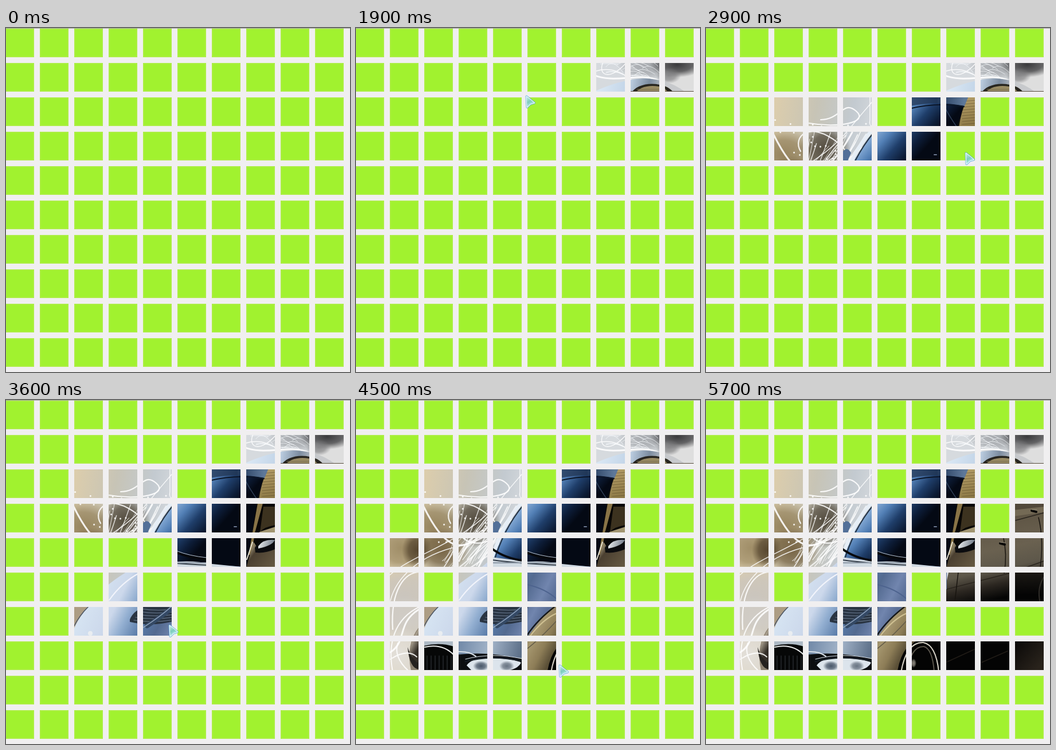
An HTML page with a canvas for the animation above (5800 ms loop, 600 by 600 pixels).

```html
<!DOCTYPE html>
<html lang="en">
<head>
<meta charset="utf-8">
<title>Tile reveal</title>
<style>
html, body { margin: 0; width: 100%; height: 100%; overflow: hidden; background: #f0eff0; }
canvas { display: block; width: 600px; height: 600px; }
</style>
</head>
<body>
<canvas id="stage" width="600" height="600"></canvas>
<script>
const LOOP = 5800, STEP = 100, PITCH = 60, TILE = 50;
const ctx = document.getElementById('stage').getContext('2d');

// Each step: pointer x, y, then the cells it uncovers (row * 10 + column).
const sweeps = [
  { start: 1, steps: [[588, 55]] },
  { start: 11, steps: [[578, 55], [561, 72, 19], [540, 88], [516, 97, 18], [490, 101], [461, 101]] },
  { start: 17, steps: [[410, 107, 17], [354, 114], [296, 118], [245, 128, 24], [185, 148, 23], [136, 175, 22]] },
  { start: 23, steps: [[141, 200, 32], [196, 216, 33], [265, 212, 34], [340, 196, 35], [412, 170, 36, 26], [469, 173, 27]] },
  { start: 29, steps: [[452, 217], [432, 255, 37, 47], [370, 272, 46], [302, 286, 45], [223, 315, 53], [152, 375, 62]] },
  { start: 35, steps: [[206, 402, 63], [284, 392, 64], [325, 348, 65, 55], [272, 278, 44], [186, 262, 43], [95, 300, 42, 41]] },
  { start: 41, steps: [[78, 345, 51], [80, 410, 61], [112, 455, 71], [232, 467, 72, 73], [354, 462, 74, 75], [393, 465, 76]] },
  { start: 47, steps: [[450, 460, 77], [530, 450, 78], [592, 321, 79], null] },
  { start: 52, steps: [[575, 341, 59], [500, 338, 58], [416, 312, 57], [478, 282, 48], [560, 245, 49], [null, null, 39]] }
];

const pointerAt = [], openAt = new Map();
for (const { start, steps } of sweeps) {
  steps.forEach((step, i) => {
    const [x, y, ...cells] = step || [null];
    pointerAt[start + i] = x === null ? null : { x, y };
    cells.forEach(cell => openAt.set(cell, start + i));
  });
}

const photo = document.createElement('canvas');
photo.width = photo.height = 600;
const pc = photo.getContext('2d');

// Stops are [offset, colour] pairs.
function grad(x0, y0, x1, y1, ...stops) {
  const g = pc.createLinearGradient(x0, y0, x1, y1);
  stops.forEach(([at, colour]) => g.addColorStop(at, colour));
  return g;
}

function fill(path, style) {
  pc.fillStyle = style;
  pc.fill(new Path2D(path));
}

function line(path, colour, width) {
  pc.strokeStyle = colour;
  pc.lineWidth = width;
  pc.stroke(new Path2D(path));
}

function blob(x, y, rx, ry, rgb, alpha = 1) {
  pc.save();
  pc.translate(x, y);
  pc.scale(rx, ry);
  const g = pc.createRadialGradient(0, 0, 0, 0, 0, 1);
  g.addColorStop(0, `rgba(${rgb},${alpha})`);
  g.addColorStop(0.55, `rgba(${rgb},${alpha * 0.75})`);
  g.addColorStop(1, `rgba(${rgb},0)`);
  pc.fillStyle = g;
  pc.fillRect(-1, -1, 2, 2);
  pc.restore();
}

function backdrop() {
  fill('M0 0H600V600H0Z', grad(120, 130, 300, 160,
    [0, '#dccdac'], [0.4, '#c7c4b6'], [0.75, '#c3cad0'], [1, '#d6dade']));
  blob(135, 222, 62, 48, '150,132,94');
  blob(208, 212, 44, 46, '82,74,60');
  blob(150, 262, 48, 40, '120,102,70');
  blob(78, 258, 50, 46, '160,142,104');
  blob(106, 262, 26, 32, '88,72,48');
  blob(84, 345, 70, 62, '202,197,190');
  blob(84, 385, 60, 44, '208,204,198');
  blob(75, 445, 55, 50, '226,223,218');
  blob(505, 66, 50, 26, '155,158,162', 0.8);
  fill('M535 55H600V115H535Z', '#dedede');
  blob(560, 64, 48, 22, '58,58,60');
  blob(545, 83, 22, 14, '120,120,122', 0.8);
}

function scribbles() {
  pc.lineCap = 'round';
  [
    'M58 306C110 262 190 250 250 176S300 128 287 100',
    'M180 166C230 175 285 165 262 145S235 160 200 160',
    'M118 186C150 250 190 300 255 182',
    'M60 350C70 310 110 270 180 255S260 200 270 180',
    'M64 400C60 330 85 300 112 300',
    'M60 440C90 420 70 390 110 365',
    'M286 120V160Q284 170 290 172',
    'M165 215C150 190 180 160 230 200S200 270 180 232',
    'M415 82C450 98 500 76 528 92',
    'M432 58C420 80 440 95 470 62M419 75Q450 66 480 90'
  ].forEach((path, i) => line(path, 'rgba(255,255,255,.88)', 1.4 + i % 3 * 0.8));
  let seed = 7;
  const rnd = () => (seed = seed * 16807 % 2147483647) / 2147483647;
  for (let i = 0; i < 26; i++) {
    const x = 150 + rnd() * 70, y = 275 + rnd() * 22;
    line(`M${x} ${y}Q${x + 20} ${y - 10 - rnd() * 40} ${x + 30 + rnd() * 60} ${y - 50 - rnd() * 60}`,
      'rgba(255,255,255,.75)', 0.7 + rnd() * 1.6);
  }
  for (let i = 0; i < 18; i++) {
    const x = 420 + rnd() * 80;
    line(`M${x} ${60 + rnd() * 25}q12 ${-rnd() * 16} 30 ${rnd() * 10}`, 'rgba(250,252,255,.7)', 1);
  }
  for (let i = 0; i < 34; i++) {
    blob(120 + rnd() * 160, 160 + rnd() * 95, 2, 2, '255,255,255');
  }
}

function cabin() {
  fill('M410 114C440 98 478 88 506 88C540 90 560 101 575 112L600 125V180H400Z',
    grad(420, 90, 540, 110, [0, '#dce9f5'], [0.45, '#c3d5e8'], [0.75, '#7c8ca0'], [1, '#c7c9cc']));
  fill('M478 116C488 99 510 95 530 99C544 102 552 108 556 116Z', '#27251f');
  fill('M484 118C492 102 512 99 528 102C540 105 546 112 548 118Z', '#988a64');
  line('M490 107H540M486 111H545', '#756a4b', 1);

  fill('M425 292L440 175L470 110H600V360H410Z',
    grad(480, 180, 515, 345, [0, '#574d3d'], [0.5, '#6a6150'], [0.7, '#5d574a'], [0.85, '#2c2721'], [1, '#050505']));
  fill('M536 300H600V360H536Z', grad(0, 300, 0, 340, [0, '#1c1915'], [1, '#040404']));
  fill('M536 178H600V194L536 203Z', '#746a55');
  fill('M536 180H590V186L536 192Z', '#51483a');
  line('M540 210L592 196M420 330L530 302L592 280', '#2a251e', 1.5);
  line('M518 236Q526 270 520 302M580 205Q590 245 582 300M440 300L434 352', '#18140f', 1.5);
  line('M568 193l8 2M513 250l8 2', '#0b0a08', 4);
  line('M568 191l9 1M513 248l9 1', '#9a917e', 1);
  line('M592 305Q576 326 583 354', '#302d29', 2);

  fill('M415 118H475L469 180V240L424 294H410Z', '#080706');
  fill('M450 123L474 116V174H439Z', grad(445, 120, 468, 170, [0, '#b7a06a'], [1, '#8b7744']));
  for (let y = 128; y < 172; y += 5) line(`M447 ${y}l24 -2`, 'rgba(76,61,31,.45)', 1);
  line('M455 119Q443 144 439 174', '#15130f', 4);
  fill('M439 180H448L434 232L428 270H423Z', '#897447');
  fill('M449 186H470V218Q451 221 443 230Z', '#3c321f');
  fill('M442 230L470 221V233L438 240Z', '#a29672');

  fill('M232 291L260 228L292 182Q330 139 362 121H453L438 174L420 291Z',
    grad(270, 150, 370, 240, [0, '#b6cfea'], [0.32, '#80a6d2'], [0.45, '#527fb5'], [0.62, '#1f3e6a'], [0.78, '#0d1d38'], [0.92, '#040914']));
  fill('M350 121Q400 111 458 119L451 136Q400 126 352 137Z',
    grad(355, 125, 450, 130, [0, '#344e72'], [0.5, '#203758'], [1, '#5e7899']));
  line('M354 141Q404 129 450 137', '#0b1628', 2);
  line('M418 141Q424 153 437 172', 'rgba(94,119,156,.5)', 1.5);
  line('M234 288Q252 219 290 178', '#e6eef6', 6);
  line('M240 284Q257 225 292 183', '#243447', 2);
  fill('M239 215Q247 206 253 218L247 232H239Z', '#526f98');
  line('M398 221h4', '#6d7990', 2);

  // mirror and sill
  fill('M419 292L432 248L441 261L470 253V293Z', grad(420, 255, 469, 290, [0, '#c8bd9b'], [0.3, '#4b4031'], [1, '#665a43']));
  fill('M434 258Q444 238 470 241V260Q451 268 435 266Z', '#0b0c0f');
  fill('M440 255Q449 242 469 244Q465 254 440 259Z', grad(440, 246, 469, 254, [0, '#f0f3f5'], [1, '#68727f']));
  line('M420 278L430 248', '#e8e4d6', 2);
}

function bonnet() {
  fill('M112 414C128 374 160 330 207 302L234 279L300 284L420 291V330L350 360L290 472H112Z',
    grad(140, 350, 300, 430, [0, '#d6e4f2'], [0.28, '#ccd8eb'], [0.42, '#93afd1'], [0.6, '#587aa7'], [0.74, '#536a90'], [0.9, '#7185ae'], [1, '#5b7098']));
  fill('M236 274L300 282Q330 280 360 286L420 292H236Z', '#d0d9e2');
  line('M238 279Q280 285 352 288', '#343d48', 2);
  line('M236 284H350', '#8e99a6', 2);
  line('M238 260Q260 276 291 280', '#07090d', 4);
  line('M297 266Q318 275 350 278', '#07090d', 4);
  line('M297 263Q320 272 350 275', '#b8c3cf', 1);
  line('M180 349Q202 318 232 302', '#f2f4fb', 2);
  line('M299 322Q330 329 350 347', '#4d638e', 2);

  fill('M216 383Q221 369 240 361H300L292 386Q252 396 216 387Z', '#293442');
  for (let i = 0; i < 5; i++) line(`M${223 + i * 3} ${384 - i * 5}q30 5 65 0`, '#65758a', 1.2);
  line('M246 394Q270 379 294 359', '#344965', 8);
  line('M239 397Q269 378 290 359', '#91a5be', 1.5);

  fill('M118 361H142Q126 379 119 397Z', '#ad9d83');
  line('M119 394Q128 376 144 360', '#485363', 1.5);
  pc.beginPath();
  pc.arc(147, 407, 4, 0, Math.PI * 2);
  pc.fillStyle = '#e9edf1';
  pc.fill();

  fill('M350 354V474H265L286 434Q315 386 350 354Z',
    grad(290, 400, 350, 430, [0, '#746f64'], [0.35, '#a6976f'], [0.7, '#8d7d57'], [1, '#5a4f37']));
  line('M298 411Q317 382 350 358', '#151719', 2.5);
  line('M302 414Q326 382 350 372', '#d0c193', 2);
  line('M272 452Q307 432 349 386', '#625b49', 1.5);
}

function front() {
  fill('M96 472Q86 426 110 396L120 420H180V472Z', '#8d8271');
  fill('M110 398Q91 426 95 451L110 470Z', grad(92, 420, 110, 430, [0, '#d5cab5'], [1, '#332d27']));
  fill('M90 431Q98 455 110 459V470Q93 468 90 431Z', '#25221f');
  fill('M118 420H170V472H118Z', '#060707');
  fill('M118 420H171V430Q146 422 118 429Z', '#aebac5');
  line('M120 431Q151 424 171 445', '#e7e9e9', 2);
  for (let x = 124; x < 168; x += 7) line(`M${x} 446v24`, '#2e3338', 1.2);
  fill('M178 420H291V450H178Z', grad(180, 421, 286, 445, [0, '#7189a8'], [0.5, '#a3b4c9'], [1, '#5d7089']));
  fill('M178 444Q232 438 292 452V472H178Z', '#0c0e11');
  line('M178 439Q198 438 209 447', '#d9e1e9', 2);
  fill('M193 463Q201 449 238 450Q274 451 288 458Q282 470 262 472H202Z', '#dce4ec');
  blob(218, 464, 14, 9, '74,88,106');
  blob(263, 464, 13, 9, '104,116,130');
  line('M191 456Q234 443 290 455', '#121820', 3);
  line('M191 452Q236 440 289 451', '#d8e2ed', 1.2);

  fill('M334 472Q344 420 378 418H600V472Z', '#040404');
  fill('M530 420H600V472H530Z', grad(540, 422, 585, 460, [0, '#0b0908'], [1, '#29231c']));
  fill('M350 418H370Q354 427 350 442Z', '#5e523b');
  line('M340 476Q349 422 379 423Q401 427 406 474', '#d5d1c6', 2);
  line('M350 476Q357 429 380 430Q395 434 398 474', '#5a554c', 2);
  blob(362, 459, 5, 8, '170,165,154', 0.8);
  line('M420 457L468 435M480 458L526 438', '#211c17', 1.5);
}

backdrop();
scribbles();
cabin();
bonnet();
front();
line('M64 474C55 425 66 382 112 360M60 452Q90 433 106 448M73 424Q65 448 91 472', 'rgba(255,255,255,.85)', 2);

const arrow = new Path2D('M1.5 1.5L15 12.5L8 14.5L2.5 20Z');
const sheen = ctx.createLinearGradient(2, 3, 10, 17);
sheen.addColorStop(0, '#b9e9df');
sheen.addColorStop(0.55, '#7fcbbd');
sheen.addColorStop(1, '#b5ecf0');

function drawPointer({ x, y }) {
  ctx.save();
  ctx.translate(x, y);
  ctx.lineJoin = 'round';
  ctx.strokeStyle = 'rgba(82,164,218,.8)';
  ctx.lineWidth = 4;
  ctx.stroke(arrow);
  ctx.strokeStyle = '#f4fcff';
  ctx.lineWidth = 2.2;
  ctx.stroke(arrow);
  ctx.fillStyle = sheen;
  ctx.fill(arrow);
  ctx.restore();
}

function drawTile(row, col, open) {
  const x = col * PITCH - 1, y = row * PITCH + 1;
  if (open) {
    const sx = Math.max(x, 0);
    ctx.drawImage(photo, sx, y, TILE, TILE, sx, y, TILE, TILE);
    return;
  }
  ctx.fillStyle = '#abee42';
  ctx.fillRect(x, y, TILE, TILE);
  ctx.fillStyle = '#a1f22f';
  ctx.fillRect(x + 2, y + 2, TILE - 4, TILE - 4);
}

function draw(now) {
  const step = Math.floor(now % LOOP / STEP);
  ctx.fillStyle = '#f0eff0';
  ctx.fillRect(0, 0, 600, 600);
  ctx.fillStyle = '#a5a5a5';
  ctx.fillRect(0, 0, 600, 1);
  for (let row = 0; row < 10; row++) {
    for (let col = 0; col < 10; col++) {
      drawTile(row, col, step >= openAt.get(row * 10 + col));
    }
  }
  // The pointer rests at the edge until the first sweep.
  const pointer = pointerAt[step > 1 && step < 11 ? 1 : step];
  if (pointer) drawPointer(pointer);
}

const began = performance.now();
function frame() {
  draw(performance.now() - began);
  requestAnimationFrame(frame);
}
frame();
</script>
</body>
</html>
```
